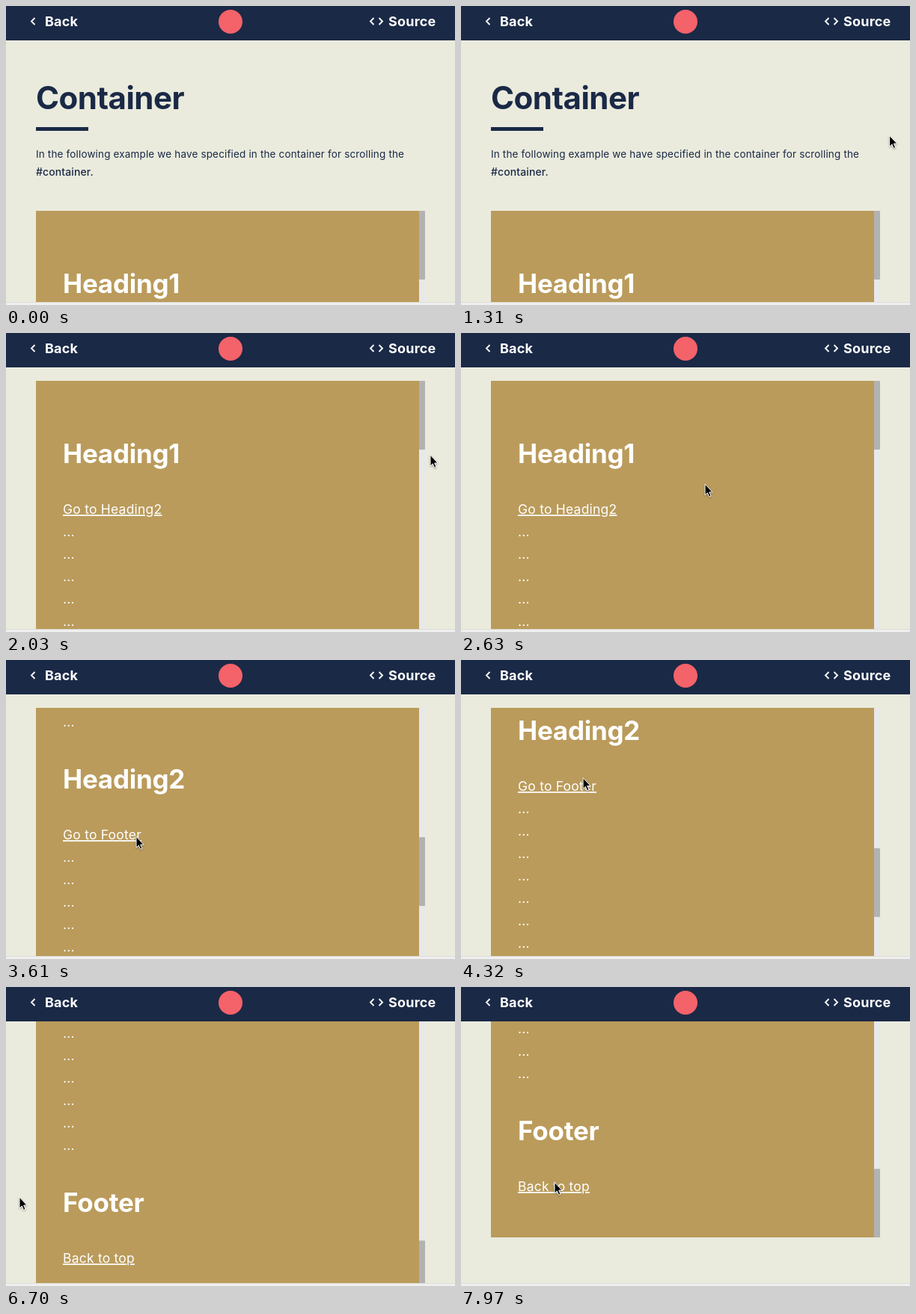
An HTML page that plays this animation: 600x400 px, repeating every 8000 ms.

```html
<!DOCTYPE html>
<html lang="en">
<head>
<meta charset="utf-8">
<title>Container scrolling</title>
<style>
  html, body { margin: 0; width: 100%; height: 100%; overflow: hidden; background: #eaebdd; }
  svg { display: block; }
  text { font-family: Inter, "Open Sans", sans-serif; white-space: pre; }
  .navy { fill: #1a2946; }
  .title { font-size: 42px; font-weight: 700; letter-spacing: -.5px; }
  .lead { font-size: 13.5px; letter-spacing: .155px; }
  .code { font-size: 14px; font-weight: 500; letter-spacing: .1px; }
  .nav { font-size: 18px; font-weight: 700; letter-spacing: .2px; fill: #fff; }
  .icon { fill: none; stroke: #fff; stroke-width: 1.9; }
  .head { font-size: 35px; font-weight: 700; letter-spacing: -.25px; fill: #fff; }
  .row { font-size: 17.5px; letter-spacing: .22px; fill: #fff; }
  .link { text-decoration: underline 1px; text-underline-offset: 2px; }
  #cursor { filter: drop-shadow(0 1px 1px rgba(0, 0, 0, .35)); }
</style>
</head>
<body>
<svg width="600" height="400" viewBox="0 0 600 400">
  <rect width="600" height="400" fill="#eaebdd"/>

  <g id="page">
    <text class="navy title" x="40" y="138">Container</text>
    <rect class="navy" x="40" y="162" width="70" height="5"/>
    <text class="navy lead" x="40" y="203">In the following example we have specified in the container for scrolling the</text>
    <text class="navy code" x="40" y="227">#container.</text>
    <svg x="40" y="274" width="520" height="400">
      <rect width="512" height="400" fill="#ba9b5b"/>
      <g id="content"></g>
      <rect x="512" width="8" height="400" fill="#e8e8ea"/>
      <rect id="thumb" x="512" width="8" height="92" rx="1" fill="#b2b2b3"/>
    </svg>
  </g>

  <rect class="navy" width="600" height="46"/>
  <path class="icon" d="M38.5 16L34 20.5L38.5 25M491.5 16L487 20.5L491.5 25M498.5 16L503 20.5L498.5 25"/>
  <text class="nav" x="52" y="27">Back</text>
  <text class="nav" x="511" y="27">Source</text>
  <circle cx="300" cy="21" r="16" fill="#f4626a"/>

  <rect y="396" width="600" height="4" fill="#efefef"/>
  <rect y="396" width="600" height="1" fill="#dcdcd8"/>

  <path id="cursor" d="M1 1.2V16L4.3 12.9L6.6 18.3L9 17.3L6.7 12H11.1Z" fill="#000" stroke="#fff"/>
</svg>

<script>
const LOOP = 8000;
const VIEW = 400, CONTENT = 1742, SECTION = 751, ROWS = 20;
const MAX = CONTENT - VIEW;

const $ = id => document.getElementById(id);
const page = $('page'), content = $('content'), thumb = $('thumb'), cursor = $('cursor');

function addText(cls, y, str) {
  const el = document.createElementNS('http://www.w3.org/2000/svg', 'text');
  el.setAttribute('class', cls);
  el.setAttribute('x', 36);
  el.setAttribute('y', y);
  el.textContent = str;
  content.append(el);
}

[['Heading1', 'Go to Heading2'], ['Heading2', 'Go to Footer'], ['Footer', 'Back to top']]
  .forEach(([head, link], i) => {
    const top = i * SECTION;
    addText('head', top + 110, head);
    addText('row link', top + 178, link);
    if (i < 2) for (let r = 0; r < ROWS; r++) addText('row', top + 208 + r * 30, '...');
  });

// Pointer moves; bend bows the path vertically
const moves = [
  { from: 940, to: 1420, x: 566, y: 162 },
  { from: 2150, to: 2990, x: 173, y: 235, bend: -6 },
  { from: 3750, to: 4350, x: 162, y: 156 },
  { from: 4510, to: 4640, x: 164, y: 160 },
  { from: 5000, to: 5600, x: 170, y: 188 },
  { from: 5610, to: 6320, x: 17, y: 280, bend: 75 },
  { from: 6900, to: 7250, x: 19, y: 186 },
  { from: 7460, to: 7960, x: 124, y: 260 }
];

const progress = (t, from, to) => Math.min(1, Math.max(0, (t - from) / (to - from)));
const easeSine = u => (1 - Math.cos(Math.PI * u)) / 2;
const easeExpo = ms => ms <= 0 ? 0 : 1 - 2 ** (-ms / 100);

function pointer(t) {
  let x = 612, y = 245;
  for (const m of moves) {
    const u = progress(t, m.from, m.to), s = easeSine(u);
    x += (m.x - x) * s;
    y += (m.y - y) * s + (m.bend || 0) * Math.sin(Math.PI * u);
  }
  return [x, y];
}

const pageScroll = t => Math.round(
  210 * easeSine(progress(t, 1350, 1940)) + 129 * easeSine(progress(t, 6530, 7040)));

const innerScroll = t => Math.min(MAX, Math.round(
  818 * easeExpo(t - 3245) + 528 * easeExpo(t - 4855)));

const place = (el, x, y) => el.setAttribute('transform', `translate(${x} ${y})`);

function draw(t) {
  const inner = innerScroll(t);
  place(page, 0, -pageScroll(t));
  place(content, 0, -inner);
  place(thumb, 0, inner * VIEW / CONTENT);
  place(cursor, ...pointer(t));
}

const start = performance.now();
function frame() {
  draw((performance.now() - start) % LOOP);
  requestAnimationFrame(frame);
}
frame();
</script>
</body>
</html>
```
